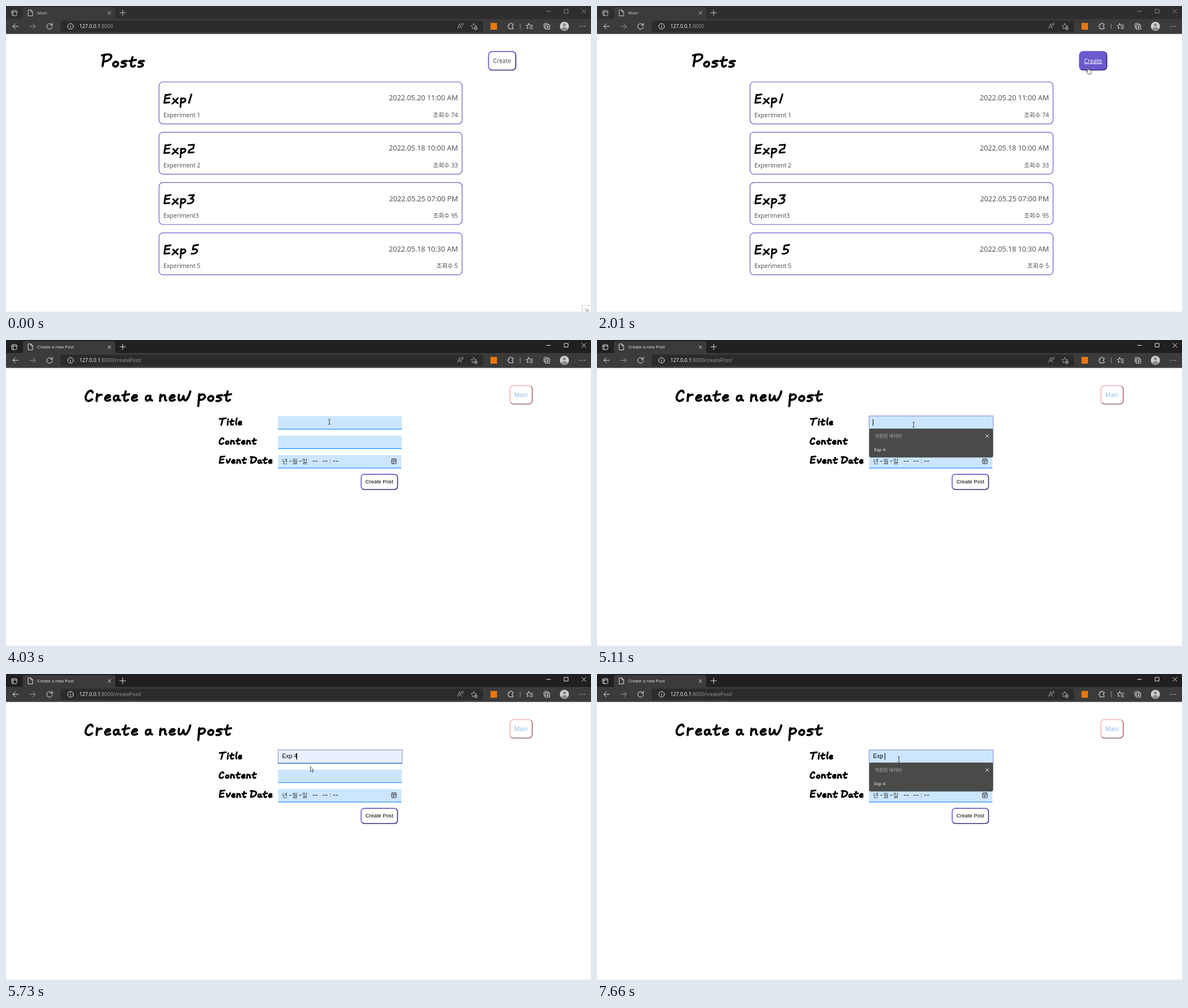
These frames come from a looping animation (1033 px wide and 542 px high, 8 s). An HTML page:

```html
<!DOCTYPE html>
<html lang="ko">
<head>
<meta charset="utf-8">
<title>Posts</title>
<style>
  html, body { margin: 0; width: 100%; height: 100%; overflow: hidden; background: #fff; }
  svg { display: block; width: 100%; height: 100%; }
  text { font-family: "Open Sans", "Noto Sans CJK KR", "Noto Sans CJK", sans-serif; white-space: pre; }
  .arial { font-family: "Liberation Sans", Arial, sans-serif; }
  .body { fill: #484848; }
  .end { text-anchor: end; }
  .mid { text-anchor: middle; }
  .line { fill: none; stroke: #e4e4e4; stroke-width: 1; stroke-linecap: round; stroke-linejoin: round; }
  .dim { stroke: #999; }
  .brush { fill: none; stroke: #000; stroke-linecap: round; stroke-linejoin: round; }
  .pointer { fill: #fff; stroke: #222; stroke-width: .8; stroke-linejoin: round; }
</style>
</head>
<body>
<svg id="stage" viewBox="0 0 1033 542" preserveAspectRatio="none"></svg>
<script>
const LOOP = 8000;

// Brush lettering: advance width and strokes, baseline at y = 0.
const GLYPHS = {
  ' ': [9, ''],
  P: [19, 'M5-22L2-2M1-21Q20-26 17-17Q14-11 4-10'],
  C: [19, 'M14-16Q12-22 6-17Q0-9 2-4Q6 2 13-4'],
  E: [20, 'M5-21L2-2M5-20L17-22M4-12L14-13M2-2L14-3'],
  T: [23, 'M2-19L21-21M12-20L7-1'],
  D: [22, 'M5-20L2-2M1-20Q21-21 18-11Q13-2 2-2'],
  a: [16, 'M10-10Q1-12 2-4Q3 1 9-4L10-10Q9-2 13-2'],
  e: [15.5, 'M2-6Q13-7 10-11Q4-13 2-5Q3 1 11-3'],
  i: [9, 'M4-12L3-1M5-18L5-17'],
  l: [9, 'M6-21Q2-5 5-2'],
  n: [17, 'M3-12L2-1M2-7Q10-15 11-8Q10-2 13-2'],
  o: [15, 'M6-10Q0-7 2-3Q7 1 10-4Q12-11 5-9'],
  p: [18, 'M4-13L2 8M3-10Q13-16 14-8Q11-2 3-3'],
  r: [15, 'M3-13L2-1M2-7Q6-13 11-12'],
  s: [14, 'M11-11Q2-12 2-8Q10-7 9-3Q5 0 1-1'],
  t: [16, 'M7-18Q3-6 5-2Q8 0 11-3M1-11L13-13'],
  v: [17, 'M3-12L6-2Q11-5 14-14'],
  w: [26, 'M3-12Q1-1 5-2Q9-3 11-10Q11-1 15-2Q20-6 23-18'],
  x: [18, 'M3-12Q8-5 14-1M14-13Q7-5 1 0'],
  1: [12, 'M10-22L4-2'],
  2: [18, 'M3-21L16-22L14-13Q4-11 3-3L15-4'],
  3: [18, 'M4-21L16-22Q13-15 8-13Q17-14 14-7Q10-1 1-2'],
  5: [18, 'M17-23L6-21L4-12Q16-15 14-7Q10-1 1-2']
};

function brush(label, x, y, scale, width) {
  let advance = 0;
  const strokes = [...label].map(char => {
    const [step, d] = GLYPHS[char];
    const path = `<path d="${d}" transform="translate(${advance})"/>`;
    advance += step;
    return path;
  }).join('');
  return `<g class="brush" role="img" aria-label="${label}" stroke-width="${width}"
    transform="translate(${x} ${y}) scale(${scale})">${strokes}</g>`;
}

const text = (label, x, y, size, attrs = '') =>
  `<text x="${x}" y="${y}" font-size="${size}" ${attrs}>${label}</text>`;
const rect = (x, y, w, h, attrs = '') =>
  `<rect x="${x}" y="${y}" width="${w}" height="${h}" ${attrs}/>`;
const line = (d, extra = '') => `<path class="line ${extra}" d="${d}"/>`;
const group = (id, content, attrs = '') => `<g id="${id}" ${attrs}>${content}</g>`;
const outset = (id, light, dark) => `<linearGradient id="${id}" x2="1" y2="1">
  <stop offset=".5" stop-color="${light}"/><stop offset=".5" stop-color="${dark}"/></linearGradient>`;

const chrome = `
  ${rect(0, 0, 1033, 24, 'id="titlebar"')}
  <path d="M30 24V6q0-4 4-4h155q4 0 4 4v18z" fill="#3b3b3b"/>
  ${rect(0, 23, 1033, 26.5, 'fill="#3b3b3b"')}
  ${rect(96.5, 26, 746, 20, 'rx="2.5" fill="#2b2b2b"')}
  <g id="tabs">
    ${line('M10 9.5q0-1.500 1.500-1.500h6q1.500 0 1.500 1.500v6q0 1.500-1.500 1.500h-6q-1.500 0-1.500-1.500zM10 10.500h9M12.500 10.500v6')}
    ${line('M39.500 7h4.500l3 3v7.500h-7.500zM44 7v3h3')}
    ${line('M180 10l5 5m0-5l-5 5M201 12h10m-5-5v10')}
    ${text('', 55, 14.8, 7.75, 'id="tabTitle" fill="#e8e8e8"')}
  </g>
  <g id="caption">${line('M954.500 9.500h7M986 6h6.500v6.500h-6.500zM1017 6l7 7m0-7l-7 7')}</g>
  ${line('M12 36h10M16.500 31.500l-4.500 4.500 4.500 4.500')}
  ${line('M42 36h10M47.500 31.500l4.500 4.500-4.500 4.500', 'dim')}
  ${line('M81.500 34a5 5 0 1 0 .5 2.500M82 30.500v3.500h-3.500')}
  <circle class="line" cx="114" cy="36" r="5"/>
  ${line('M114 35.500v3M114 33.300v.1')}
  <text x="129.5" y="39.2" font-size="8.8" fill="#fff">127.0.0.1<tspan id="urlPath" fill="#9c9c9c"></tspan></text>
  ${line('M797.500 40l3.500-9 3.500 9M798.700 37h4.600M804.500 30.500q1.300 1.500 0 3.500M806.500 30q1.300 2.500 0 5', 'dim')}
  ${line('M826 31l1.500 3.300 3.600.4-2.700 2.400.7 3.500-3.100-1.700-3.100 1.700.7-3.500-2.700-2.400 3.600-.4z', 'dim')}
  <circle cx="829.5" cy="39.5" r="3" fill="#999"/>
  <path d="M828 39.500h3m-1.500-1.500v3" stroke="#2b2b2b" stroke-width=".8"/>
  ${rect(855.5, 30, 11.5, 12, 'fill="#e9780c"')}
  ${line('M888 32h2q0-2 1.500-2t1.500 2h2.500v2.500q-2 0-2 1.500t2 1.500v3h-7.500v-2.500q-2 0-2-2t2-1.500z')}
  ${line('M908 31.500v9', 'dim')}
  ${line('M923 31l1.300 3h5.700M923 31l-1.300 3-3 .5 2.300 2-.6 3.500 2.600-1.500M925.500 37h4.500M925.500 40h4.500')}
  ${line('M952 39q-2 0-2-1.500v-5q0-1.500 1.500-1.500h5q1.500 0 1.500 1.500M952.500 33.500h7.500v7.500h-7.500zM956.200 35.300v4M954.200 37.300h4')}
  <circle cx="986" cy="36" r="8" fill="#d0d0d0"/>
  <circle cx="986" cy="33.5" r="2.8" fill="#8b8b8b"/>
  <path d="M980.500 41.500q.5-4 5.500-4t5.500 4q-5.500 4-11 0z" fill="#8b8b8b"/>
  ${[1013.5, 1017.5, 1021.5].map(x => `<circle cx="${x}" cy="36" r=".8" fill="#e4e4e4"/>`).join('')}`;

const posts = [
  ['Exp1', 'Experiment 1', '2022.05.20 11:00 AM', 74],
  ['Exp2', 'Experiment 2', '2022.05.18 10:00 AM', 33],
  ['Exp3', 'Experiment3', '2022.05.25 07:00 PM', 95],
  ['Exp 5', 'Experiment 5', '2022.05.18 10:30 AM', 5]
];

const card = ([title, body, date, views], i) => `<g transform="translate(0 ${i * 89.1})">
  ${rect(270.2, 134.5, 535.2, 74.3, 'rx="7" fill="none" stroke="#6a5acd" stroke-width="1.2"')}
  ${brush(title, 278, 173, .75, 3.9)}
  ${text(body, 278, 196.7, 10.5, 'class="body"')}
  ${text(date, 798, 167.4, 12.55, 'class="body end"')}
  ${text('조회수 ' + views, 798, 196.7, 10.6, 'class="body end"')}</g>`;

const home = `
  ${brush('Posts', 168.5, 108.5, 1, 3.8)}
  ${rect(852, 80.7, 48.2, 32.8, 'id="createButton" rx="6.5" stroke="url(#blue)" stroke-width="1.7"')}
  ${text('Create', 876, 100.7, 10.5, 'id="createLabel" class="mid"')}
  ${posts.map(card).join('')}`;

const field = (y, w = 218.6) =>
  rect(480.3, y, w, 23.5, 'fill="#cce6ff"') + rect(480.3, y + 22.4, w, 1.2, 'fill="#1e90ff"');

const form = `
  ${brush('Create a new post', 139, 109, 1, 3.8)}
  ${rect(889.8, 80.7, 39.5, 32.8, 'rx="6.5" fill="#fff" stroke="url(#coral)" stroke-width="1.6"')}
  ${text('Main', 909.3, 100.7, 10.2, 'class="mid" fill="#82b7e8"')}
  ${brush('Title', 376, 151, .585, 5)}
  ${brush('Content', 376, 185, .585, 5)}
  ${brush('Event Date', 376, 219, .585, 5)}
  ${field(135)}${field(169.4)}${field(203.7, 217.8)}
  ${group('focus', rect(480.5, 134.5, 219, 24, 'id="focusBox" stroke="#8a84da" stroke-width="1"')
    + rect(480, 157.5, 219.5, 1.2, 'fill="#2d68cf"'))}
  ${text('', 487.4, 149.3, 10.5, 'id="value" class="arial"')}
  ${rect(487, 140, 1, 12, 'id="caret"')}
  <g fill="#333">
    ${[['년', 487.5], ['월', 505.3], ['일', 522.8]].map(([c, x]) => text(c, x, 218.5, 10.5)).join('')}
    ${[['-', 499.5], ['-', 517], ['--', 541], ['--', 558.5], ['--', 577]].map(([c, x]) =>
      text(c, x, 219, 15, 'class="arial"')).join('')}
    ${text(':', 571.5, 218, 10.5)}
  </g>
  <path d="M681 211.500q0-1 1-1h6q1 0 1 1v6.500q0 1-1 1h-6q-1 0-1-1zM681 213h8M683 215.300h4M683 217h2"
    fill="none" stroke="#222"/>
  ${rect(627.2, 237.9, 64.2, 26.8, 'rx="5.5" fill="#fff" stroke="url(#blue)" stroke-width="1.6"')}
  ${text('Create Post', 659.3, 254.3, 9.3, 'class="arial mid"')}
  ${group('popup', `
    ${rect(480.8, 157.3, 218.4, 50.5, 'rx="3" fill="#4a4a4a" stroke="#3c3c3c" stroke-width=".6"')}
    ${text('저장된 데이터', 491, 172.7, 8.2, 'fill="#b4b4b4"')}
    ${line('M686 167l6 6m0-6l-6 6')}
    ${group('rowHover', rect(484, 181.5, 189, 24, 'rx="2" fill="#777"')
      + line('M680 190h9M682.500 190v-1.500h4v1.500M681 190l.8 8h5.400l.8-8M683.500 192.500v3M685.500 192.500v3', 'dim'))}
    ${text('Exp 4', 489.5, 196.7, 7.75, 'id="suggestion" fill="#fff"')}`)}`;

const overlay = `
  ${rect(0, 541, 1033, 1, 'fill="#f0f0f0"')}
  <path id="status" d="M0 537.500h98q2.700 0 2.700 2.700v1.800h-100.700z" fill="#202020"/>
  ${group('tooltip', rect(1017.5, 530.5, 20, 15, 'fill="#fff" stroke="#ccc"')
    + text('녹', 1022, 543, 9.5, 'fill="#888"'))}
  ${group('cursor', `
    <circle id="click" cx="-.5" cy="1" r="6.5" fill="#dcc21e" opacity=".75"/>
    <path id="arrow" class="pointer" d="M0 0v8.500l2-1.800 1.400 3 1.400-.7-1.400-2.900h2.700z"/>
    <path id="hand" class="pointer" d="M-.9 6V.8q.9-1.300 1.800 0v4l4.300.9q1.300.4 1.100 2l-.7 3.300-.8 1.700h-4.500l-3.300-5q.2-1.500 2.100.5z"/>
    <path id="ibeam" d="M-2-4.500q2 0 2 1v7q0 1-2 1M2-4.500q-2 0-2 1M2 4.500q-2 0-2-1" fill="none" stroke="#333" stroke-width=".9"/>`)}`;

document.getElementById('stage').innerHTML = `<defs>
    ${outset('blue', '#6a5acd', '#352b78')}${outset('coral', '#f7b1b5', '#a0686a')}</defs>
  ${rect(0, 0, 1033, 542, 'fill="#fff"')}
  ${group('home', home)}${group('form', form)}${chrome}${overlay}`;

// Hard changes: [time, value]
const pointerKind = [[0, ''], [430, 'arrow'], [1950, 'hand'], [3010, 'arrow'], [3820, 'ibeam'], [5250, 'arrow'], [5870, 'ibeam']];
const clicking = [[0, 0], [2950, 1], [3080, 0], [4160, 1], [4230, 0], [5450, 1], [5520, 0]];
const statusOpacity = [[0, 0], [2340, .35], [2410, .7], [2480, 1], [3080, 0]];
const popupOpacity = [[0, 0], [4230, 1], [5520, .9], [5590, .72], [5660, .35], [5730, 0], [6800, 1]];
const caretOn = [[0, 0], [4230, 1], [4710, 0], [5110, 1], [6080, 0], [6670, 1], [7130, 0], [7660, 1]];
const typed = [[0, ''], [5320, 'Exp 4'], [6800, 'Exp ']];
const caretX = { '': 487, 'Exp 4': 513, 'Exp ': 508 };

// Pointer path: [time, x, y]
const path = [
  [430, 985, 534], [570, 950, 440], [710, 895, 270], [850, 870, 213],
  [1590, 870, 213], [1600, 870, 206], [1810, 868, 140], [2010, 867, 108], [2270, 871, 105],
  [3470, 871, 105], [3480, 867, 108], [3690, 760, 135], [3890, 610, 147], [4030, 571, 145],
  [4159, 571, 145], [4160, 560, 146], [5100, 560, 146], [5110, 559, 150], [5380, 541, 188],
  [5520, 539, 189], [5590, 538, 174], [5870, 537, 154], [6210, 533, 151]
];
const TICK = 68;

const at = (table, t) => table.findLast(([time]) => time <= t)[1];

function pointerAt(t) {
  const i = Math.max(0, path.findLastIndex(([time]) => time <= t));
  const [t0, x0, y0] = path[i];
  const [t1, x1, y1] = path[i + 1] || path[i];
  const k = t1 > t0 ? Math.max(0, Math.floor((t - t0) / TICK) * TICK / (t1 - t0)) : 0;
  return [x0 + (x1 - x0) * k, y0 + (y1 - y0) * k];
}

const ui = {};
document.querySelectorAll('#stage [id]').forEach(el => ui[el.id] = el);
const set = (id, name, value) => ui[id].setAttribute(name, value);
const show = (id, on) => set(id, 'display', on ? 'inline' : 'none');

function render(t) {
  const onHome = t < 3080, active = t >= 2950, hover = t >= 1950;
  show('home', onHome);
  show('form', !onHome);
  set('titlebar', 'fill', active ? '#202020' : '#2e2e2e');
  set('tabs', 'opacity', active ? 1 : .85);
  set('caption', 'opacity', active ? 1 : .5);
  ui.tabTitle.textContent = onHome ? 'Main' : 'Create a new Post';
  ui.urlPath.textContent = onHome ? ':8000' : ':8000/createPost/';

  set('createButton', 'fill', hover ? '#6a5acd' : '#fff');
  set('createLabel', 'fill', hover ? '#fff' : '#444');
  set('createLabel', 'text-decoration', hover ? 'underline' : 'none');
  set('status', 'opacity', at(statusOpacity, t));
  show('tooltip', t < 70);

  const value = at(typed, t), rowHover = t >= 5320 && t < 5730;
  ui.value.textContent = value;
  show('focus', t >= 4230);
  set('focusBox', 'fill', value === 'Exp 4' ? '#e8f0fe' : '#cce6ff');
  show('caret', at(caretOn, t));
  set('caret', 'x', caretX[value]);

  const fading = t >= 5520 && t < 5730;
  set('popup', 'opacity', at(popupOpacity, t));
  set('popup', 'transform', fading ? 'translate(8.85 2.7) scale(.985)' : '');
  show('rowHover', rowHover);
  set('suggestion', 'font-weight', rowHover ? 700 : 400);

  const kind = at(pointerKind, t);
  for (const id of ['arrow', 'hand', 'ibeam']) show(id, id === kind);
  show('click', at(clicking, t));
  set('cursor', 'transform', `translate(${pointerAt(t)})`);
}

const start = performance.now();
function frame() {
  render((performance.now() - start) % LOOP);
  requestAnimationFrame(frame);
}
render(0);
requestAnimationFrame(frame);
</script>
</body>
</html>
```
